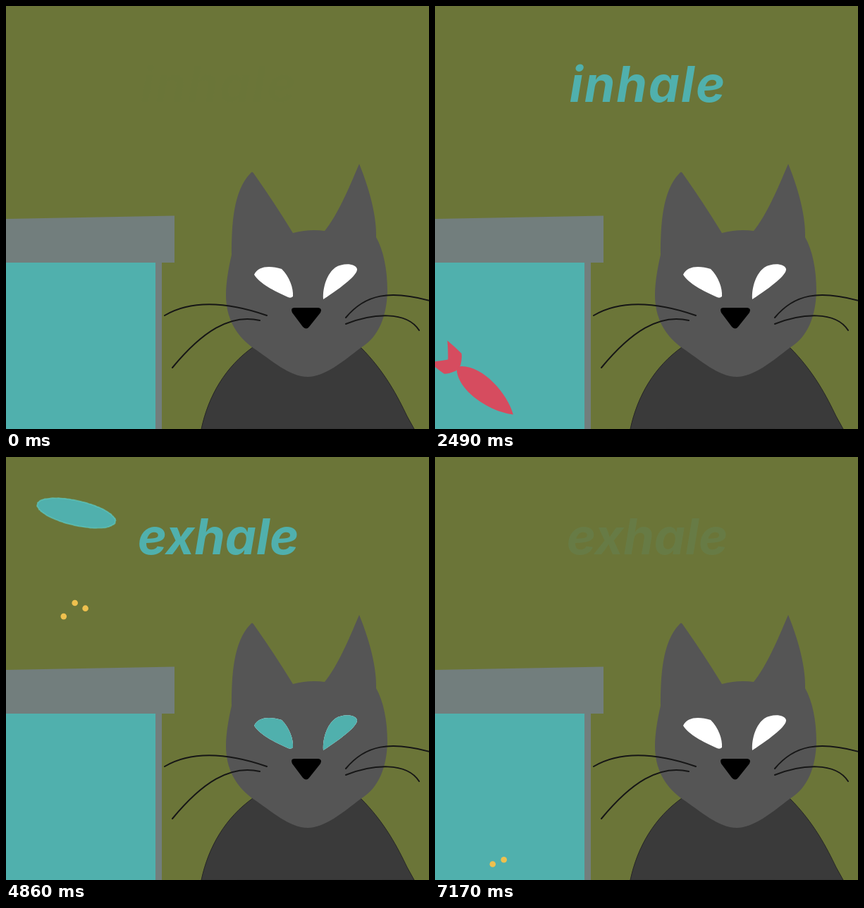
Animation, 600 px wide and 600 px high, one loop 7.2 s. Source, as an HTML page with a canvas:

```html
<!DOCTYPE html>
<html lang="en">
<head>
<meta charset="utf-8">
<title>Breathe</title>
<style>
  html, body { margin: 0; width: 100%; height: 100%; overflow: hidden; background: #6b7538; }
  canvas, svg { position: absolute; left: 0; top: 0; width: 600px; height: 600px; display: block; }
  text {
    font: italic 700 70px Inter, "Open Sans", sans-serif;
    font-feature-settings: "cv11";
    fill: #50b0ad;
    text-anchor: middle;
  }
  #in { letter-spacing: 2px; }
</style>
</head>
<body>
<canvas id="stage" width="600" height="600"></canvas>
<svg viewBox="0 0 600 600">
  <text id="in" x="302" y="136" opacity="0">inhale</text>
  <text id="out" x="301" y="138" opacity="0">exhale</text>
</svg>
<script>
const LOOP = 7200;
const ctx = document.getElementById('stage').getContext('2d');
const inhale = document.getElementById('in');
const exhale = document.getElementById('out');

const BG = '#6b7538', TEAL = '#50b0ad', GREY = '#727e7d';
const HEAD = '#555555', BODY = '#3a3a3a', RED = '#d64c5f', FOOD = '#eec04e';

const body = new Path2D('M277 600 C287 553 311 512 350 484 H503 C538 519 556 555 569 582 L579 600Z');
const head = new Path2D(
  'M347 237 Q349 234 351 237 Q380 278 407 322 Q430 316 452 319 ' +
  'C470 297 485 262 501 224 C515 258 526 298 525 328 ' +
  'C535 346 541 372 541 405 C540 438 530 469 503 485 ' +
  'C478 504 452 526 428 526 C402 526 378 503 349 484 ' +
  'C324 465 312 440 312 410 C312 392 316 370 320 353 C320 312 322 262 347 237Z');
const eyes = new Path2D(
  'M352 381 C358 368 375 368 391 373 C402 384 408 400 407 412 Q404 415 400 413 C380 404 360 394 352 381Z ' +
  'M450 416 C449 398 456 379 467 371 C478 364 496 365 498 373 C499 381 478 398 450 416Z');
const nose = new Path2D('M409 428 H443 Q449 429 446 435 L430 455 Q426 460 421 455 L406 435 Q403 428 409 428Z');
const whiskers = new Path2D(
  'M225 439 C260 418 310 418 370 439 M236 513 C278 462 318 436 360 446 ' +
  'M482 442 C510 408 545 403 601 418 M482 451 C520 436 568 432 586 460');
const lid = new Path2D('M0 302 L239 297.5 V364 H0Z');

// Fish faces +x, centred on the middle of its body
const fish = new Path2D('M52 0 C24 -19 -33 -26 -53 0 C-33 26 24 19 52 0Z');
const tail = new Path2D(
  'M-50 -5 Q-55 -15 -60 -19 Q-73 -20 -87 -20 Q-77 -10 -69 0 ' +
  'Q-77 10 -87 20 Q-73 20 -60 19 Q-55 15 -50 5Z');

const clamp = v => Math.max(0, Math.min(1, v));
const ramp = (t, a, b) => clamp((t - a) / (b - a));
const fade = (t, a, b, c, d) => ramp(t, a, b) * (1 - ramp(t, c, d));

function fill(path, color) {
  ctx.fillStyle = color;
  ctx.fill(path);
}

function stroke(path, color, width) {
  ctx.strokeStyle = color;
  ctx.lineWidth = width;
  ctx.stroke(path);
}

// Piecewise linear value through [time, value] pairs
function track(t, keys) {
  for (let i = 1; i < keys.length; i++) {
    const [t0, v0] = keys[i - 1], [t1, v1] = keys[i];
    if (t < t1) return v0 + (v1 - v0) * ramp(t, t0, t1);
  }
  return keys[keys.length - 1][1];
}

const noise = i => {
  const s = Math.sin(i * 127.1 + 3.7) * 43758.5453;
  return (s - Math.floor(s)) * 2 - 1;
};

function drawFish(t) {
  if (t < 900 || t > 3650) return;
  const d = t - 1830;
  ctx.save();
  ctx.beginPath();
  ctx.rect(0, 364, 212, 236);
  ctx.clip();
  ctx.translate(14 + 0.0865 * d, 495 + 0.046 * d + 4.69e-5 * d * d);
  ctx.rotate((27 + 25 * d / 1260) * Math.PI / 180);
  fill(fish, RED);
  fill(tail, RED);
  ctx.restore();
}

function drawPool(t) {
  if (t < 3765 || t > 5830) return;
  const rx = track(t, [[3765, 0], [3960, 81], [4170, 74.5], [4500, 63], [5250, 50], [5550, 31], [5830, 0]]);
  const ratio = track(t, [[4500, 0.335], [5550, 0.26]]);
  const turn = track(t, [[4500, 8], [5250, 18], [5550, 42], [5830, 62]]);
  const rough = 1 - ramp(t, 4500, 5300);
  const n = 110;
  ctx.save();
  ctx.globalAlpha = track(t, [[5250, 1], [5550, 0.66], [5830, 0]]);
  ctx.translate(98 + 3.5 * ramp(t, 4170, 5550), 79 + ramp(t, 4170, 5550));
  ctx.rotate(turn * Math.PI / 180);
  const rim = new Path2D();
  for (let i = 0; i < n; i++) {
    const a = i / n * 2 * Math.PI;
    const j = 1 + 0.018 * rough * noise(i);
    rim.lineTo(rx * j * Math.cos(a), rx * ratio * j * Math.sin(a));
  }
  rim.closePath();
  fill(rim, TEAL);
  ctx.globalAlpha *= rough;
  stroke(rim, '#62d2c8', 1.8);
  ctx.restore();
}

function drawFood(t) {
  if (t < 3900) return;
  const d = t - 4170;
  const late = Math.max(0, t - 5550);
  const bits = [
    [81.8, 121 + 0.1521 * d],
    [97.7, 98 + 0.1577 * d],
    [112.6, 101 + 0.1645 * d + 0.0133 * late]
  ];
  ctx.globalAlpha = ramp(t, 3900, 4000);
  ctx.fillStyle = FOOD;
  for (const [x, y] of bits) {
    ctx.beginPath();
    ctx.arc(x, y, 4.3, 0, 2 * Math.PI);
    ctx.fill();
  }
  ctx.globalAlpha = 1;
}

function drawCat(t) {
  fill(body, BODY);
  stroke(body, '#262626', 1);
  fill(head, HEAD);
  fill(eyes, '#ffffff');
  ctx.globalAlpha = fade(t, 3600, 4000, 6000, 6400);
  fill(eyes, TEAL);
  ctx.globalAlpha = 1;
  fill(nose, '#000000');
  ctx.lineCap = 'round';
  stroke(whiskers, '#161616', 2);
}

function draw(t) {
  ctx.fillStyle = BG;
  ctx.fillRect(0, 0, 600, 600);
  ctx.fillStyle = TEAL;
  ctx.fillRect(0, 363, 212, 237);
  drawFish(t);
  ctx.fillStyle = GREY;
  ctx.fillRect(212, 363, 9, 237);
  fill(lid, GREY);
  drawCat(t);
  drawPool(t);
  drawFood(t);
  inhale.setAttribute('opacity', fade(t, 0, 420, 3180, 3600));
  exhale.setAttribute('opacity', fade(t, 3600, 4020, 6780, 7220));
}

const start = performance.now();
function tick(now) {
  draw(Math.max(0, now - start) % LOOP);
  requestAnimationFrame(tick);
}
draw(0);
requestAnimationFrame(tick);
</script>
</body>
</html>
```
